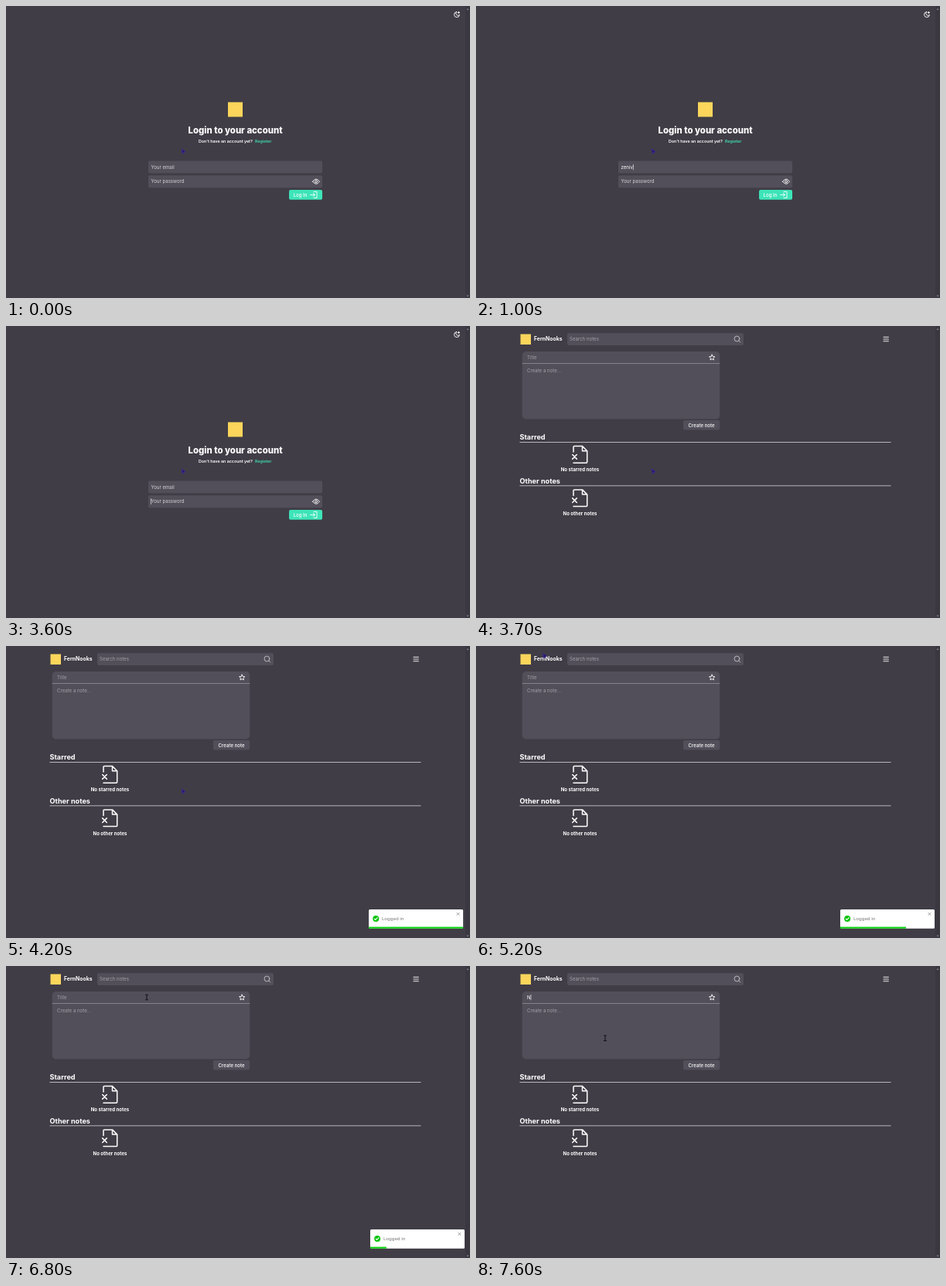
These frames come from a looping animation (600x378 px, 8000 ms). An HTML page:

```html
<!DOCTYPE html>
<html lang="en">
<head>
<meta charset="utf-8">
<title>Notes login</title>
<style>
html, body { margin: 0; width: 100%; height: 100%; overflow: hidden; background: #403d46; }
svg { display: block; width: 600px; height: 378px; }
text { font: 6.1px Inter, sans-serif; fill: #fff; white-space: pre; }
.title { font-size: 11.4px; font-weight: 800; }
.small { font-size: 5.33px; font-weight: 600; }
.brand { font-size: 6.86px; font-weight: 700; }
.heading { font-size: 9.15px; font-weight: 700; }
.bold { font-weight: 700; }
.medium { font-weight: 500; }
.hint { fill: #d3d2d6; }
.dim { fill: #a3a1a8; }
.field { fill: #524f5a; }
.line { fill: none; stroke: #fff; stroke-width: .9; stroke-linecap: round; stroke-linejoin: round; }
#toast text { font-family: "Noto Sans", sans-serif; fill: #757575; }
</style>
</head>
<body>
<svg viewBox="0 0 600 378">
  <defs>
    <g id="emptyFile" class="line" stroke-width="1.5">
      <path style="stroke-width:1.5" d="M126 163V156.700Q126 155.500 127.200 155.500H137.500L143.700 161.700V176Q143.700 177.200 142.500 177.200H126M137.500 155.500V161.700H143.700M124.700 166.500L130.300 172.100M130.300 166.500L124.700 172.100"/>
    </g>
  </defs>
  <rect width="600" height="378" fill="#403d46"/>
  <rect x="594" width="6" height="378" fill="#3a3740"/>
  <path d="M595.500 5L597 3L598.500 5ZM595.500 374.500L597 376.500L598.500 374.500Z" fill="#8b8990"/>

  <g id="login">
    <path class="line" d="M582.600 7.600A3.500 3.500 0 1 0 586.500 11.500A2.700 2.700 0 0 1 582.600 7.600ZM585.400 7.300V9.700M584.200 8.500H586.600"/>
    <rect x="287" y="124.500" width="19" height="19" fill="#fbd65b"/>
    <text class="title" x="296.500" y="165" text-anchor="middle">Login to your account</text>
    <text class="small" x="249" y="177">Don't have an account yet?</text>
    <text class="small" x="322" y="177" style="fill:#3de0b5">Register</text>
    <rect class="field" x="184" y="200.500" width="225" height="16" rx="2"/>
    <rect class="field" x="184" y="219.300" width="225" height="16" rx="2"/>
    <text id="email" x="187.500" y="210.800"></text>
    <text id="password" x="187.500" y="229.400"></text>
    <path class="line" d="M396.600 227.200Q401 220.800 405.400 227.200Q401 233.600 396.600 227.200Z"/>
    <circle class="line" cx="401" cy="227.200" r="1.500"/>
    <rect x="366" y="238" width="43" height="12.800" rx="2" fill="#3de4b8"/>
    <text class="medium" x="371.500" y="246.600">Log In</text>
    <path class="line" d="M398 240.400H402V248.400H398M393.500 244.400H399.300M397.300 242.300L399.400 244.400L397.300 246.500"/>
  </g>

  <g id="notes">
    <rect x="57.500" y="10.500" width="13.500" height="13.500" fill="#fbd65b"/>
    <text class="brand" x="75" y="19.400">FernNooks</text>
    <rect class="field" x="118" y="9.300" width="228" height="15.700" rx="2"/>
    <text class="dim" x="121" y="19.300">Search notes</text>
    <path class="line" style="stroke:#c4c3c8" d="M340 19.200L341.800 21"/>
    <circle class="line" style="stroke:#c4c3c8" cx="337.400" cy="16.500" r="3.400"/>
    <path class="line" d="M527 14.300H533.400M527 17H533.400M527 19.700H533.400"/>
    <rect class="field" x="59.700" y="33" width="255.500" height="87.500" rx="5"/>
    <path d="M59.700 48.500H315.200" stroke="#918f97" stroke-width=".8"/>
    <text id="noteTitle" x="66" y="42.800"></text>
    <path id="star" class="line"/>
    <text class="dim" x="66" y="60.300">Create a note...</text>
    <rect class="field" x="268" y="122" width="47.200" height="12.500" rx="2"/>
    <text class="medium" x="291.600" y="130.500" text-anchor="middle">Create note</text>
    <text class="heading" x="56.500" y="147">Starred</text>
    <text class="heading" x="56.500" y="203.500">Other notes</text>
    <path d="M56.500 150.500H536.500M56.500 206.800H536.500" stroke="#d6d5d9" stroke-width=".8"/>
    <use href="#emptyFile"/>
    <use href="#emptyFile" y="56.400"/>
    <text class="bold" x="134.500" y="188.400" text-anchor="middle">No starred notes</text>
    <text class="bold" x="134.500" y="244.800" text-anchor="middle">No other notes</text>
  </g>

  <g id="toast">
    <rect x="471" y="341" width="122" height="24.700" rx="1.500" fill="#fff"/>
    <circle cx="480.200" cy="353" r="4" fill="#07c40c"/>
    <path class="line" style="stroke-width:1.100" d="M478.300 353.100L479.700 354.500L482.200 351.700"/>
    <text x="488" y="355.200">Logged in</text>
    <path class="line" style="stroke:#77757c;stroke-width:.7" d="M584.900 345.300L588.100 348.500M588.100 345.300L584.900 348.500"/>
    <rect id="bar" x="471" y="363.600" height="2.100" fill="#07d00c"/>
  </g>

  <rect id="caret" width=".6" height="7.400" fill="#fff"/>
  <path id="arrow" d="M-1.800 -3L3 .8L.8 1.200L-.6 3.400Z" fill="#21165e" stroke="#3a26a0" stroke-width=".9"/>
  <path id="beam" d="M-2 -3.300H2M0 -3.300V3.300M-2 3.300H2" fill="none" stroke="#17151c" stroke-width="1.100"/>
</svg>
<script>
const LOOP = 8000;
const PAGE_AT = 3700, FOCUS_PASSWORD = 2400, CLEAR_AT = 3500, FOCUS_TITLE = 6900;
const TOAST_IN = 3577, TOAST_TIME = 700, BAR_START = 4277, TOAST_OUT = 7324;
const address = 'zenivaso@wilu.com';
const emailKeys = [300, 500, 700, 900, 1000, 1100, 1200, 1300, 1500, 1700, 1800, 1900, 2000, 2200, 2200, 2300, 2300];
const passwordKeys = [2700, 2800, 2900, 3000, 3100, 3200, 3300];
// time, x, y
const pointer = [[4300, 229, 188], [5200, 88.5, 12.5], [5700, 72, 30], [6200, 118, 42],
  [6800, 182, 40.5], [7050, 182, 40.5], [7550, 167, 93.3]];
// share of the animation, offset in px, opacity
const bounceIn = [[0, 1140, 0], [.6, -9.5, 1], [.75, 3.8, 1], [.9, -1.9, 1], [1, 0, 1]];
const bounceOut = [[0, 0, 1], [.2, -7.6, 1], [1, 760, 0]];

const $ = id => document.getElementById(id);
const show = (el, on) => el.style.display = on ? '' : 'none';
const typed = (keys, t) => keys.filter(k => k <= t).length;
const easeOut = p => 1 - (1 - p) ** 3;
const ease = p => 1 - (1 - p ** 1.3) ** 2.8;
const smooth = p => p * p * (3 - 2 * p);

function track(keys, t, easing) {
  if (t <= keys[0][0]) return keys[0].slice(1);
  const next = keys.findIndex(k => k[0] > t);
  if (next < 0) return keys.at(-1).slice(1);
  const a = keys[next - 1], b = keys[next];
  const p = easing((t - a[0]) / (b[0] - a[0]));
  return a.slice(1).map((v, i) => v + (b[i + 1] - v) * p);
}

function fill(el, value, placeholder, hintClass) {
  el.textContent = value || placeholder;
  el.setAttribute('class', value ? '' : hintClass);
}

function placeCaret(el, value, since, t) {
  const visible = el && (t - since) % 1000 < 500;
  show($('caret'), visible);
  if (!visible) return;
  const width = value ? el.getComputedTextLength() + .3 : 0;
  $('caret').setAttribute('x', +el.getAttribute('x') + width - .2);
  $('caret').setAttribute('y', +el.getAttribute('y') - 5.9);
}

function drawToast(t) {
  const leaving = t >= TOAST_OUT;
  const p = (t - (leaving ? TOAST_OUT : TOAST_IN)) / TOAST_TIME;
  const [x, opacity] = leaving ? track(bounceOut, p, ease) : track(bounceIn, p, easeOut);
  show($('toast'), t >= PAGE_AT && !(leaving && p >= 1));
  $('toast').setAttribute('transform', `translate(${x} 0)`);
  $('toast').setAttribute('opacity', opacity);
  const left = 1 - (t - BAR_START) / (TOAST_OUT - BAR_START);
  $('bar').setAttribute('width', 122 * Math.max(0, Math.min(1, left)));
}

function drawPointer(t) {
  const [x, y] = track(pointer, t, smooth);
  const overCard = x > 60 && y > 33 && y < 120 && t > 5200;
  show($('arrow'), !overCard);
  show($('beam'), overCard);
  for (const id of ['arrow', 'beam']) $(id).setAttribute('transform', `translate(${x} ${y})`);
}

function draw(t) {
  const loggedIn = t >= PAGE_AT;
  show($('login'), !loggedIn);
  show($('notes'), loggedIn);

  const cleared = t >= CLEAR_AT;
  const email = cleared ? '' : address.slice(0, typed(emailKeys, t));
  const password = cleared ? '' : '•'.repeat(typed(passwordKeys, t));
  const title = t >= 7600 ? 'N' : '';
  fill($('email'), email, 'Your email', 'hint');
  fill($('password'), password, 'Your password', 'hint');
  fill($('noteTitle'), title, 'Title', 'dim');

  if (loggedIn) placeCaret(t >= FOCUS_TITLE && $('noteTitle'), title, title ? 7600 : FOCUS_TITLE, title ? 7600 : t);
  else if (t >= FOCUS_PASSWORD) placeCaret($('password'), password, Math.max(FOCUS_PASSWORD, ...passwordKeys.filter(k => k <= t), cleared ? CLEAR_AT : 0), t);
  else placeCaret(t >= 100 && $('email'), email, Math.max(100, ...emailKeys.filter(k => k <= t)), t);

  drawToast(t);
  drawPointer(t);
}

$('star').setAttribute('d', 'M' + Array.from({ length: 10 }, (_, i) => {
  const r = i % 2 ? 1.8 : 3.8, a = i * Math.PI / 5;
  return `${305.2 + r * Math.sin(a)} ${40.9 - r * Math.cos(a)}`;
}).join('L') + 'Z');

const start = performance.now();
function tick() {
  draw((performance.now() - start) % LOOP);
  requestAnimationFrame(tick);
}
tick();
</script>
</body>
</html>
```
